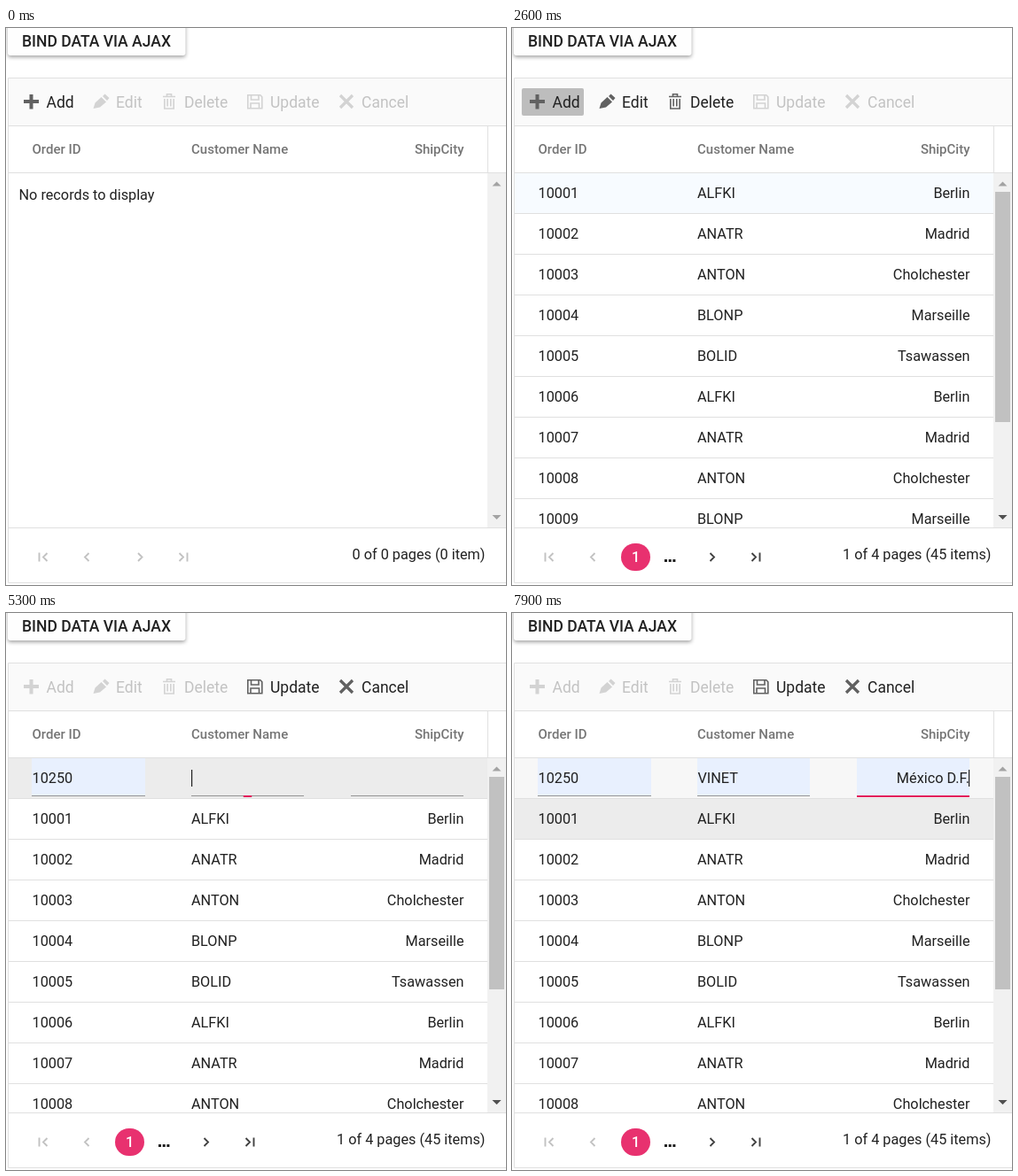
An HTML page that plays this animation: 564 px wide and 629 px high, repeating every 8 s.

```html
<!DOCTYPE html>
<html lang="en">
<head>
<meta charset="utf-8">
<title>Grid editing with autofill</title>
<style>
html, body { margin: 0; width: 100%; height: 100%; overflow: hidden; background: #fff; }
svg { display: block; width: 564px; height: 629px; font: 16.25px Roboto, sans-serif; fill: #212121; }
text { white-space: pre; }
.end { text-anchor: end; }
.medium { font-weight: 500; }
.head { font-size: 15px; font-weight: 500; fill: #757575; }
.line { stroke: #e0e0e0; fill: none; }
.button { fill: #fefefe; filter: drop-shadow(0 2px 2px rgba(0, 0, 0, .36)); }
.button.on { fill: #d0d0d0; }
.tool { font-size: 17.5px; opacity: .25; }
.tool.on { opacity: 1; }
.icon { fill: #616161; stroke: #616161; stroke-width: 0; }
.stroke { fill: none; stroke-width: 1.6; }
.show { visibility: hidden; }
.show.on { visibility: visible; }
.rows.on { transform: translateY(46px); }
.hover { fill: #ececec; }
.underline { fill: #949494; }
.accent { fill: #e3165b; transform-box: fill-box; transform-origin: center; }
.nav { fill: none; stroke: #424242; stroke-width: 1.9; }
.off { stroke: #c2c2c2; }
.popup { font: 15px "Open Sans", sans-serif; fill: #333; }
.panel { fill: #fdfdfd; filter: drop-shadow(0 1px 2px rgba(0, 0, 0, .3)); }
</style>
</head>
<body>
<svg id="stage" viewBox="0 0 564 629">
  <defs><clipPath id="body"><rect x="2" y="164" width="541" height="400"/></clipPath></defs>

  <rect class="button" data-on="600-2500" x="2" y="-12" width="200.500" height="43" rx="3"/>
  <text class="medium" x="18" y="21" font-size="17.5">BIND DATA VIA AJAX</text>

  <rect x="2" y="56" width="562" height="54" fill="#fafafa"/>
  <rect class="show" data-on="1400-1500" x="167" y="68" width="88" height="31" rx="2" fill="#e0e0e0"/>
  <rect class="show" data-on="2300-2500" x="11" y="68" width="70" height="31" rx="2" fill="#e0e0e0"/>
  <rect class="show" data-on="2500-2700" x="11" y="68" width="70" height="31" rx="2" fill="#bdbdbd"/>
  <g class="tool" data-on="0-2700">
    <path class="icon" d="M26.500 75h4v6h6.500v4h-6.500v6.500h-4V85H20v-4h6.500z"/>
    <text x="45.500" y="90">Add</text>
  </g>
  <g class="tool" data-on="800-2700">
    <path class="icon" d="M98.500 91l2-6.500 7-6.500 5.500 5.500-7 6zM109 77l2.500-2.500 5 4.500-2.500 3z"/>
    <text x="124" y="90">Edit</text>
  </g>
  <g class="tool" data-on="800-2700">
    <path class="icon stroke" d="M177 77.500h14M181.500 77v-2.200h5V77M178.800 80v11h10.400V80M182.200 80v8.500M185.800 80v8.500"/>
    <text x="201" y="90">Delete</text>
  </g>
  <g class="tool" data-on="2700-">
    <path class="icon stroke" d="M272.800 75.800h14l2 2v13h-16zM276.500 76v5h8.500v-5M276 91v-6h9.500v6"/>
    <text x="298" y="90">Update</text>
  </g>
  <g class="tool" data-on="2700-">
    <path class="icon stroke" style="stroke-width:3.200" d="M377 76l14 14M391 76l-14 14"/>
    <text x="401" y="90">Cancel</text>
  </g>

  <text class="head" x="29.500" y="142">Order ID</text>
  <text class="head" x="209" y="142">Customer Name</text>
  <text class="head end" x="516.500" y="142">ShipCity</text>

  <text class="show" data-on="0-800" x="14.500" y="194">No records to display</text>
  <g clip-path="url(#body)">
    <g class="show" data-on="800-"><g class="rows" id="rows" data-on="2700-"></g></g>
    <g class="show" data-on="2700-">
      <rect x="3" y="164" width="540" height="45" fill="#f7f7f7"/>
      <rect class="hover show" data-on="3100-3600 4900-5700 6700-7100" x="3" y="164" width="540" height="45"/>
      <path class="line" d="M3 209.500H543"/>
      <g id="fields"></g>
    </g>
  </g>

  <rect x="543" y="164" width="21" height="400" fill="#f1f1f1"/>
  <rect class="show" data-on="800-2700" x="545" y="185" width="17" height="260" fill="#c1c1c1"/>
  <rect class="show" data-on="2700-" x="545" y="185" width="17" height="240" fill="#c1c1c1"/>
  <path fill="#a3a3a3" d="M548.500 178.500l5-5 5 5zM548.500 550l5 5 5-5z"/>
  <path class="show" data-on="800-" fill="#505050" d="M548.500 550l5 5 5-5z"/>

  <path class="line" d="M564 56.500H2.500V626.500H564M3 110.500H564M3 163.500H564M543.500 111V163M3 564.500H564"/>

  <path class="nav off" d="M37.500 592.500v10M46.500 593l-4.500 4.500 4.500 4.500M93.500 593l-4.500 4.500 4.500 4.500"/>
  <g class="show" data-on="0-800">
    <path class="nav off" d="M149 593l4.500 4.500-4.500 4.500M195.500 593l4.500 4.500-4.500 4.500M204.500 592.500v10"/>
    <text class="end" x="540.500" y="600">0 of 0 pages (0 item)</text>
  </g>
  <g class="show" data-on="800-">
    <rect x="123" y="582" width="33" height="31" rx="15.500" fill="#e8316f"/>
    <text class="medium" x="139.500" y="603" text-anchor="middle" fill="#fff">1</text>
    <path d="M172 600h3v3h-3zm4.700 0h3v3h-3zm4.700 0h3v3h-3z"/>
    <path class="nav" d="M223.500 593l4.500 4.500-4.500 4.500M270.500 593l4.500 4.500-4.500 4.500M279.500 592.500v10"/>
    <text class="end" x="540.500" y="600">1 of 4 pages (45 items)</text>
  </g>

  <g id="popups"></g>
</svg>
<script>
const LOOP = 8000, TICK = 100;
const el = id => document.getElementById(id);

const customers = ['ALFKI', 'ANATR', 'ANTON', 'BLONP', 'BOLID'];
const cities = ['Berlin', 'Madrid', 'Cholchester', 'Marseille', 'Tsawassen'];
const rowStates = [
  [['1700-2000 6300-6700 7700-', '#ececec'], ['2000-2700', '#f7fbff'], ['6700-6800', '#f9f9f9']],
  [['4400-4900', '#ececec']]
];

el('rows').innerHTML = Array.from({ length: 9 }, (_, i) => {
  const y = 164 + 46 * i;
  const fills = (rowStates[i] || []).map(([on, fill]) =>
    `<rect class="show" data-on="${on}" x="3" y="${y}" width="540" height="45" fill="${fill}"/>`);
  return `${fills.join('')}
    <path class="line" d="M3 ${y + 45.5}H543"/>
    <text x="29.500" y="${y + 28}">${10001 + i}</text>
    <text x="209" y="${y + 28}">${customers[i % 5]}</text>
    <text class="end" x="516.500" y="${y + 28}">${cities[i % 5]}</text>`;
}).join('');

// hovers: [item index, time window]; values: [text, time window]; carets: [x, time window]
const fields = [
  {
    x: 29, width: 128, focus: [2650, 4880], filled: '3800-',
    values: [['10248', '3800-3900'], ['10250', '3900-']],
    carets: [[29.5, '2700-3200 3600-4100'], [76.5, '4500-4900']],
    popup: { x: 67, open: '3500-4400', hovers: [[0, '3800-3900'], [1, '3900-4400']],
      items: ['10248', '10250', '10251', '10249', '10247', '10253'] }
  },
  {
    x: 209, width: 127, focus: [5250, 6700], filled: '5700-',
    values: [['VINET', '5700-5800 5900-'], ['TOMSP', '5800-5900']],
    carets: [[209.5, '5300-5800'], [255.5, '6400-6700']],
    popup: { x: 247, open: '5400-6300', hovers: [[0, '5700-5800 5900-6300'], [1, '5800-5900']],
      items: ['VINET', 'TOMSP', 'HANAR', 'VICTE', 'SUPRD', 'CHOPS'] }
  },
  {
    x: 389, width: 127, focus: [6700, LOOP + 500], filled: '7100-', end: true,
    values: [['México D.F.', '7100-']],
    carets: [[515.5, '6700-7200 7800-']],
    popup: { x: 283, open: '6900-7700', hovers: [[0, '7100-7700']],
      items: ['México D.F.', 'Rio de Janeiro', 'Münster', 'Charleroi', 'Lyon'] }
  }
];

el('fields').innerHTML = fields.map(({ x, width, filled, values, carets, end }) => `
  <rect class="show" data-on="${filled}" x="${x}" y="164" width="${width}" height="43" fill="#e8f0fe"/>
  <rect class="underline" x="${x}" y="206" width="${width}" height="1"/>
  <rect class="accent" x="${x}" y="206" width="${width}" height="2"/>
  ${values.map(([text, on]) =>
    `<text class="show ${end ? 'end' : ''}" data-on="${on}" x="${end ? 516 : x + .5}" y="192">${text}</text>`).join('')}
  ${carets.map(([cx, on]) =>
    `<rect class="show" data-on="${on}" x="${cx - .5}" y="177" width="1.200" height="19"/>`).join('')}
`).join('');

el('popups').innerHTML = fields.map(({ x, width, popup: { x: left, open, hovers, items } }) => {
  const bottom = 227 + 45 * items.length, right = left + 195, notch = x + width / 2;
  const pills = hovers.map(([i, on]) => {
    const y = 222 + 45 * i;
    return `<g class="show" data-on="${on}">
      <rect x="${left + 5}" y="${y}" width="185" height="44" rx="4" fill="#f0f0f0"/>
      <path class="nav" style="stroke:#333" d="M${left + 163} ${y + 17}l10 10m0-10l-10 10"/></g>`;
  });
  return `<g class="popup show" data-on="${open}">
    <path class="panel" d="M${left + 8} 216H${notch - 8}l8-8 8 8H${right - 8}q8 0 8 8V${bottom - 8}q0 8-8 8H${left + 8}q-8 0-8-8V224q0-8 8-8z"/>
    ${pills.join('')}
    ${items.map((text, i) => `<text x="${left + 15.5}" y="${250 + 45 * i}">${text}</text>`).join('')}
  </g>`;
}).join('');

const timed = [...document.querySelectorAll('[data-on]')].map(node => ({
  node,
  spans: node.dataset.on.split(' ').map(span => {
    const [from, to] = span.split('-').map(Number);
    return [from, to || LOOP];
  })
}));
const accents = document.querySelectorAll('.accent');

const ease = u => {
  u = Math.min(1, Math.max(0, u));
  return u * u * (3 - 2 * u);
};

function render(t) {
  for (const { node, spans } of timed)
    node.classList.toggle('on', spans.some(([from, to]) => t >= from && t < to));
  fields.forEach(({ focus: [from, to] }, i) => {
    const scale = ease((t - from) / 300) * (1 - ease((t - to) / 200));
    accents[i].style.transform = `scaleX(${scale})`;
  });
}

const start = performance.now();
function frame() {
  const t = (performance.now() - start) % LOOP;
  render(Math.floor(t / TICK) * TICK);
  requestAnimationFrame(frame);
}
frame();
</script>
</body>
</html>
```
